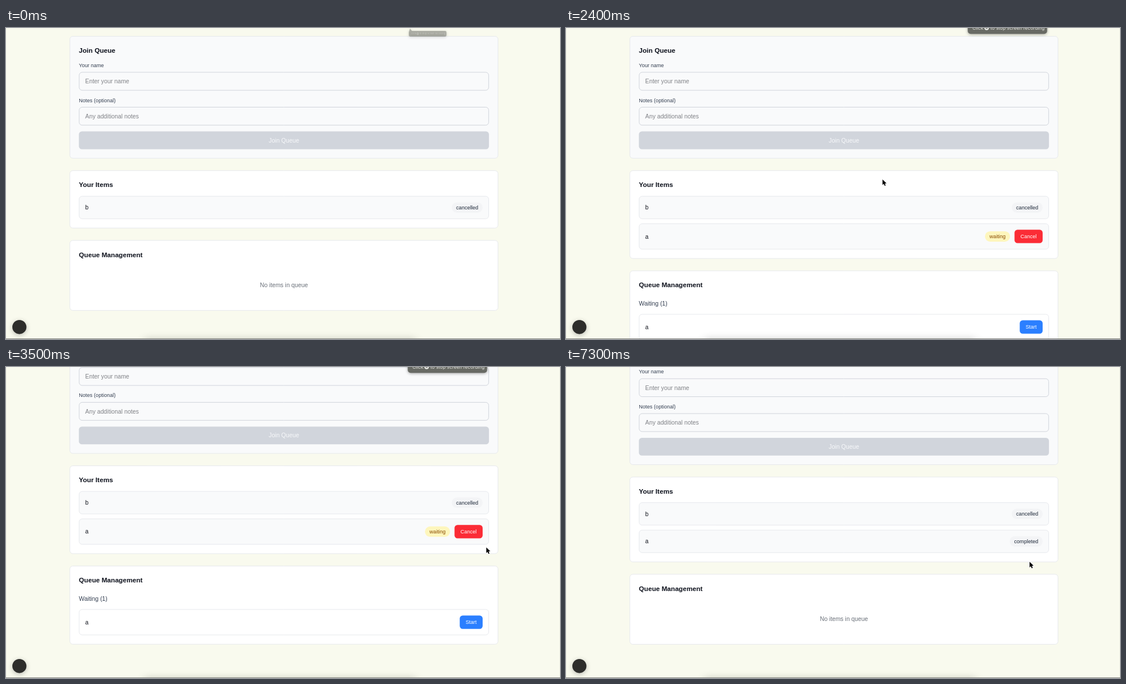
Write an HTML page with a canvas that moves like this. It is 960 px wide and 540 px high and loops after 8000 ms.

```html
<!DOCTYPE html>
<html lang="en">
<head>
<meta charset="utf-8">
<title>Queue demo</title>
<style>
html, body { margin: 0; width: 100%; height: 100%; overflow: hidden; background: #f9faee; }
canvas { display: block; width: 960px; height: 540px; }
</style>
</head>
<body>
<canvas id="stage"></canvas>
<script>
const canvas = document.getElementById('stage');
const dpr = window.devicePixelRatio || 1;
canvas.width = 960 * dpr;
canvas.height = 540 * dpr;
const ctx = canvas.getContext('2d');

const LOOP = 8000, STEP = 100;
const U = 0.6445;                 // page unit in stage pixels
const TOP = 13.9, LEFT = 110.2, RIGHT = 853;
const IN_L = LEFT + 25 * U, IN_R = RIGHT - 25 * U;
const MID = (LEFT + RIGHT) / 2;
const BASE = 16 * 0.645, SMALL = 14 * 0.645, HEAD = 18 * 0.645;
const SANS = '"Liberation Sans", Arial, sans-serif';
const INK = '#0d111c', LABEL = '#364153', HINT = '#808287';
const LINE = '#e5e7eb', FIELD = '#d1d5dc', PALE = '#f9fafb';

// time, x, y
const POINTER = [
  [100, 462, 384], [700, 400, 91], [1400, 400, 91], [1600, 386, 258],
  [1800, 381, 188], [2100, 381, 190], [2600, 639, 302], [2900, 639, 302],
  [3500, 832, 313], [3600, 832, 313], [4100, 805, 439], [4800, 805, 439],
  [5400, 806, 432], [5700, 806, 432], [5800, 806, 431], [6500, 806, 431],
  [7300, 803, 338]
];
// time, offset
const SCROLL = [
  [2700, 0], [2800, 11], [2900, 34.7], [3000, 54], [3100, 65],
  [3200, 71], [3400, 76.1], [6399, 76.1], [6400, 56.6]
];

const clamp = v => Math.max(0, Math.min(1, v));
const smooth = v => v * v * (3 - 2 * v);

function track(keys, t, ease) {
  if (t <= keys[0][0]) return keys[0].slice(1);
  for (let i = 1; i < keys.length; i++) {
    const a = keys[i - 1], b = keys[i];
    if (t <= b[0]) {
      const k = ease((t - a[0]) / (b[0] - a[0]));
      return a.slice(1).map((v, j) => v + (b[j + 1] - v) * k);
    }
  }
  return keys[keys.length - 1].slice(1);
}

const yOf = n => TOP + n * U;

function box(x, y, w, h, r, fill, stroke, lw = 0.9) {
  ctx.beginPath();
  if (stroke) {
    const d = lw / 2;
    ctx.roundRect(x + d, y + d, w - lw, h - lw, r);
  } else ctx.roundRect(x, y, w, h, r);
  if (fill) { ctx.fillStyle = fill; ctx.fill(); }
  if (stroke) { ctx.strokeStyle = stroke; ctx.lineWidth = lw; ctx.stroke(); }
}

// y is the middle of the line box
function text(str, x, y, size, color, align = 'left', weight = 400) {
  ctx.font = `${weight} ${size}px ${SANS}`;
  ctx.textAlign = align;
  ctx.fillStyle = color;
  ctx.fillText(str, x, y + size * 0.3465);
}

function widthOf(str) {
  ctx.font = `400 ${SMALL}px ${SANS}`;
  return ctx.measureText(str).width;
}

// Right-aligned label chip; returns its left edge
function chip(str, right, y, pad, height, radius, fill, color) {
  const w = widthOf(str) + 2 * pad * U, h = height * U;
  box(right - w, y - h / 2, w, h, radius, fill);
  text(str, right - w / 2, y, SMALL, color, 'center');
  return right - w;
}
const pill = (str, right, y, fill = '#f3f4f6', color = '#1e2939') =>
  chip(str, right, y, 12, 28, 14 * U, fill, color);
const button = (str, right, y, fill) => chip(str, right, y, 16, 36, 8 * U, fill, '#fff');

function card(top, bottom, title, fill = '#fff') {
  box(LEFT, yOf(top), RIGHT - LEFT, (bottom - top) * U, 8 * U, fill, LINE);
  text(title, IN_L, yOf(top + 39), HEAD, INK, 'left', 700);
}

function row(top, height, name, fill, stroke = LINE, lw = 0.9) {
  box(IN_L, yOf(top), IN_R - IN_L, height * U, 8 * U, fill, stroke, lw);
  text(name, IN_L + (lw > 1 ? 18 : 17) * U, yOf(top + height / 2), BASE, '#14171f');
  return yOf(top + height / 2);
}

function field(label, top, hint, value, focus) {
  text(label, IN_L, yOf(top - 18), SMALL, LABEL);
  const y = yOf(top), w = IN_R - IN_L, h = 50 * U;
  if (focus) box(IN_L - 1, y - 1, w + 2, h + 2, 9 * U, PALE, '#2079e4', 1.8);
  else box(IN_L, y, w, h, 8 * U, PALE, FIELD, 1);
  text(value || hint, IN_L + 17 * U, yOf(top + 25), BASE, value ? '#14171f' : HINT);
}

function joinCard(t) {
  const typed = t >= 1200 && t < 2200;
  const focus = t >= 800 && t < 2100;
  card(0, 330, 'Join Queue', PALE);
  field('Your name', 97, 'Enter your name', typed ? 'a' : '', focus);
  field('Notes (optional)', 191, 'Any additional notes', '', false);
  if (focus && t >= 900 && t < 1700) {
    ctx.fillStyle = '#111';
    ctx.fillRect(IN_L + 17 * U + (typed ? 5.8 : 0), yOf(122) - 6, 0.8, 12);
  }
  const fill = !typed ? FIELD : t >= 1800 ? '#155dfc' : '#2b7fff';
  box(IN_L, yOf(257), IN_R - IN_L, 48 * U, 8 * U, fill);
  text('Join Queue', MID, yOf(281), BASE, typed ? '#fff' : '#f7f8fa', 'center');
}

function itemsCard(phase) {
  const tall = phase === 'waiting' ? 70 : 62;
  const end = phase === 'idle' ? 518 : 505 + tall + 25;
  const right = IN_R - 17 * U;
  card(362, end, 'Your Items');
  pill('cancelled', right, row(431, 62, 'b', PALE));
  if (phase !== 'idle') {
    const y = row(505, tall, 'a', PALE);
    if (phase === 'waiting') {
      const x = button('Cancel', right, y, '#fb2c36');
      pill('waiting', x - 12 * U, y, '#fef6bd', '#894b00');
    } else if (phase === 'processing') {
      pill('processing', right, y, '#dbeafe', '#193cb8');
    } else pill('completed', right, y);
  }
  return end + 32;
}

function manageCard(phase, top, t) {
  const title = 'Queue Management';
  if (phase === 'waiting') {
    card(top, top + 212, title);
    text('Waiting (1)', IN_L, yOf(top + 89), BASE, LABEL);
    const y = row(top + 117, 70, 'a', '#fff');
    button('Start', IN_R - 17 * U, y, t >= 4000 ? '#155dfc' : '#2b7fff');
  } else if (phase === 'processing') {
    card(top, top + 246, title);
    text('Currently Processing', IN_L, yOf(top + 89), BASE, LABEL);
    const y = row(top + 117, 72, 'a', '#eff6ff', '#b4d5fb', 1.3);
    button('Complete', IN_R - 18 * U, y, t >= 4900 ? '#00a63e' : '#00c950');
  } else {
    card(top, top + 190, title);
    text('No items in queue', MID, yOf(top + 121), BASE, '#6a7079', 'center');
  }
}

// Recording hint that grows out of the top edge
function hint(t) {
  const grow = smooth(clamp((t - 0) / 400));
  const leave = smooth(clamp((t - 4800) / 500));
  const k = grow * (1 - leave);
  if (leave >= 1) return;
  const s = 0.475 + 0.525 * k;
  ctx.save();
  ctx.globalAlpha = (0.45 + 0.55 * grow) * (1 - leave);
  ctx.translate(698 - 1.8 * k, 10 - 10.3 * k);
  ctx.scale(s, s);
  ctx.shadowColor = 'rgba(0,0,0,.35)';
  ctx.shadowBlur = 5 * dpr;
  ctx.shadowOffsetY = dpr;
  ctx.fillStyle = '#686a64';
  ctx.beginPath();
  ctx.roundRect(0, -10.5, 137.5, 21, 5);
  ctx.moveTo(0.5, -8);
  ctx.lineTo(4.5, -19);
  ctx.lineTo(12, -10);
  ctx.fill();
  ctx.shadowColor = 'transparent';
  ctx.fillStyle = '#e9eae6';
  ctx.font = '400 8.1px Inter, sans-serif';
  ctx.textAlign = 'left';
  ctx.fillText('Click', 8, 3);
  ctx.fillText('to stop screen recording', 39.3, 3);
  ctx.beginPath();
  ctx.arc(32.7, 0, 4, 0, 7);
  ctx.fill();
  ctx.fillStyle = '#686a64';
  ctx.fillRect(31.2, -1.5, 3, 3);
  ctx.restore();
}

function poly(points) {
  ctx.beginPath();
  points.forEach(([x, y]) => ctx.lineTo(x, y));
  ctx.closePath();
}

function pointer(t) {
  if (t < 100 || (t >= 1200 && t < 1400)) return;
  const [x, y] = track(POINTER, t, smooth);
  ctx.save();
  ctx.translate(x, y);
  ctx.lineJoin = 'round';
  if (t < 2000 && y > 77 && y < 108) {
    const beam = (color, lw) => {
      ctx.strokeStyle = color;
      ctx.lineWidth = lw;
      ctx.beginPath();
      ctx.moveTo(-2.6, -5.4); ctx.quadraticCurveTo(0, -5.4, 0, -3.8);
      ctx.lineTo(0, 4.4);
      ctx.quadraticCurveTo(0, 6, -2.6, 6);
      ctx.moveTo(2.6, -5.4); ctx.quadraticCurveTo(0, -5.4, 0, -3.8);
      ctx.moveTo(0, 4.4); ctx.quadraticCurveTo(0, 6, 2.6, 6);
      ctx.moveTo(-1.5, 1.6); ctx.lineTo(1.5, 1.6);
      ctx.stroke();
    };
    beam('rgba(255,255,255,.9)', 2.2);
    beam('#111', 1.1);
  } else {
    poly([[0.3, 0.3], [0.3, 10], [2.5, 8], [4, 11.5], [5.8, 10.7], [4.3, 7.3], [7.2, 7.1]]);
    ctx.strokeStyle = '#fff';
    ctx.lineWidth = 1.5;
    ctx.stroke();
    ctx.fillStyle = '#000';
    ctx.fill();
  }
  ctx.restore();
}

function chrome(t) {
  if (t >= 900) {
    ctx.fillStyle = 'rgba(0,0,0,.03)';
    ctx.fillRect(0, 0, 1, 540);
    ctx.fillRect(959, 0, 1, 540);
  }
  // soft shade along the bottom edge
  ctx.save();
  ctx.shadowColor = 'rgba(0,0,0,.3)';
  ctx.shadowBlur = 16 * dpr;
  ctx.fillStyle = '#999';
  ctx.fillRect(240, 543, 470, 20);
  ctx.restore();
  ctx.fillStyle = '#858681';
  ctx.fillRect(0, 539, 960, 1);

  ctx.save();
  ctx.shadowColor = 'rgba(0,0,0,.25)';
  ctx.shadowBlur = 8 * dpr;
  ctx.shadowOffsetY = 2 * dpr;
  ctx.fillStyle = '#2d2d2b';
  ctx.beginPath();
  ctx.arc(23.2, 519.2, 12.2, 0, 7);
  ctx.fill();
  ctx.restore();
}

function phaseAt(t) {
  if (t < 2200) return 'idle';
  if (t < 4500) return 'waiting';
  return t < 6400 ? 'processing' : 'completed';
}

function draw(t) {
  ctx.setTransform(dpr, 0, 0, dpr, 0, 0);
  ctx.fillStyle = '#f9faee';
  ctx.fillRect(0, 0, 960, 540);
  const phase = phaseAt(t);
  ctx.save();
  ctx.translate(0, -track(SCROLL, t, v => v)[0]);
  joinCard(t);
  manageCard(phase, itemsCard(phase), t);
  ctx.restore();
  chrome(t);
  hint(t);
  pointer(t);
}

const start = performance.now();
function frame() {
  const t = (performance.now() - start) % LOOP;
  draw(Math.floor(t / STEP) * STEP);
  requestAnimationFrame(frame);
}
frame();
</script>
</body>
</html>
```
